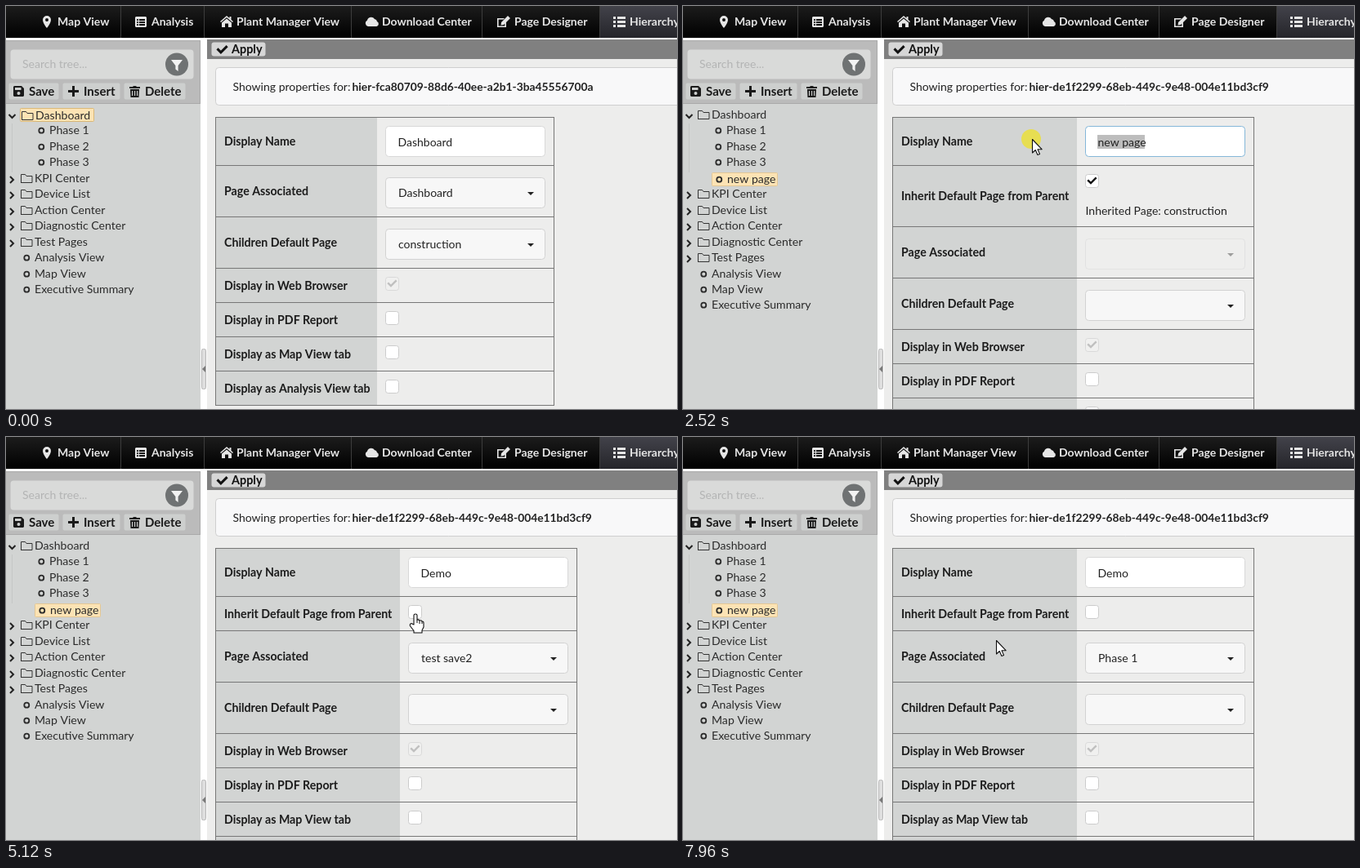
An HTML page with a canvas for the animation above (8000 ms loop, 821x494 px).

```html
<!DOCTYPE html>
<html lang="en">
<head>
<meta charset="utf-8">
<title>Hierarchy editor</title>
<style>
html, body { margin: 0; width: 100%; height: 100%; overflow: hidden; background: #fff; }
canvas { display: block; }
</style>
</head>
<body>
<canvas id="stage" width="821" height="494"></canvas>
<script>
const ctx = document.getElementById('stage').getContext('2d');
const LOOP = 8000;

// Bursts of picture changes: first time, last time, number of steps.
const BURSTS = [
  [0, 0, 1], [250, 860, 9], [1100, 1310, 4], [1460, 1460, 1], [1610, 1610, 1], [1710, 2410, 10],
  [2520, 2520, 1], [2560, 2650, 2], [2810, 2810, 1], [3110, 3270, 3], [3420, 3510, 2],
  [3970, 4060, 2], [4270, 4450, 3], [4530, 5060, 8], [5120, 5820, 10], [5910, 5910, 1],
  [6000, 6460, 7], [6710, 7020, 5], [7110, 7110, 1], [7260, 7410, 3], [7720, 7960, 4]
];
const PATH = [
  [250, 581, 472], [480, 335, 290], [710, 130, 125], [860, 101, 100], [1310, 101, 99],
  [1700, 101, 99], [2030, 572, 168], [2100, 572, 168], [2410, 464, 165], [2520, 427, 163],
  [2560, 426, 160], [2650, 421, 141], [3970, 421, 141], [4060, 440, 142], [4270, 446, 148],
  [4450, 487, 180], [4780, 501, 217], [5200, 501, 217], [5290, 518, 176], [5590, 531, 266],
  [5920, 531, 266], [6150, 682, 300], [6460, 739, 370], [6640, 741, 371], [7020, 592, 372],
  [7260, 592, 372], [7340, 588, 370], [7640, 588, 370], [7720, 530, 338], [7800, 430, 285],
  [7880, 348, 258], [7960, 383, 249]
];
const CLICKS = [[1310, 1460], [2090, 2560], [4860, 5120], [5660, 5810], [6150, 6450], [7260, 7410]];
const INSERTED = 1610, UNCHECKED = 5120, OPENED = 5735, CLOSED = 7330;
const SCROLL = 577;

const ICONS = {
  pin: 'M5 0A5 5 0 0 1 10 5C10 9 5 15 5 15S0 9 0 5A5 5 0 0 1 5 0ZM5 3A2 2 0 1 0 5 7A2 2 0 1 0 5 3Z',
  table: 'M1 0H13L14 1V12L13 13H1L0 12V1ZM2 3H4V5H2ZM5 3H12V5H5ZM2 6H4V8H2ZM5 6H12V8H5ZM2 9H4V11H2ZM5 9H12V11H5Z',
  home: 'M8 0L11.5 3V1H13.5V4.8L16 7L15 8L8 2L1 8L0 7ZM8 3.6L14 8.6V14H10V9.5H6V14H2V8.6Z',
  cloud: 'M4 12A4 4 0 0 1 3 4.5A5 5 0 0 1 12 3A3.5 3.5 0 0 1 15 6A3.2 3.2 0 0 1 14.5 12Z',
  edit: 'M0 3H9L7.5 4.6H1.6V12.4H9.4V9.5L11 8V14H0ZM13 0L16 3L8 11L4.5 11.6L5 8Z',
  list: 'M0 0H3V3H0ZM5 0H15V3H5ZM0 5H3V8H0ZM5 5H15V8H5ZM0 10H3V13H0ZM5 10H15V13H5Z',
  save: 'M1 0H10L13 3V12L12 13H1L0 12V1ZM2 2V5H9.5V2ZM6.5 7A2 2 0 1 0 6.5 11A2 2 0 1 0 6.5 7Z',
  plus: 'M5 0H8V5H13V8H8V13H5V8H0V5H5Z',
  trash: 'M0 1H4L5 0H8L9 1H13V3H0ZM1 4H12L11.5 14H1.5ZM3 6V12H4.2V6ZM6 6V12H7.2V6ZM9 6V12H10.2V6Z',
  funnel: 'M0 0H14L8.6 7V14L5.4 11.5V7Z'
};
const ARROW = 'M0 0V16.5L3.8 13L6.4 19L9 17.9L6.5 12.2H11.6Z';
const HAND = 'M-2 13V1.5Q-2 0 0 0Q2 0 2 1.5V7Q4 6.4 5 8Q7 7.3 8 9Q10 8.6 10 11V16L8 20V23H-2V20.5L-6.6 14.5Q-7.2 12 -5 11.5Z';

const NAV = [
  ['Map View', 'pin', 45, 12, 63], ['Analysis', 'table', 158, 13, 178],
  ['Plant Manager View', 'home', 262, 12, 282], ['Download Center', 'cloud', 439, 13, 460],
  ['Page Designer', 'edit', 601, 12, 622], ['Hierarchy', 'list', 743, 13, 763]
];
const BUTTONS = [['Save', 'save', 3, 65, 9, 28], ['Insert', 'plus', 69, 140, 76, 95], ['Delete', 'trash', 144, 220, 151, 170]];
const FOLDERS = ['KPI Center', 'Device List', 'Action Center', 'Diagnostic Center', 'Test Pages'];
const PAGES = ['Analysis View', 'Map View', 'Executive Summary'];
const OPTIONS = [
  'test save2', 'Label Link Test', 'Test Label Links2', 'Kitchen Sink', 'Dummy Page for|deletion',
  'Dashboard', 'construction', 'Map View', 'Analysis View', 'Device List', 'Action Center',
  'Test Page for|Summary', 'KPI Center', 'Executive Summary', 'Test Pages', 'No Response from|Device',
  'Phase 1', 'Phase 2', 'More Status Available', 'PV Analog Output|Saturated', 'Phase 3'
];

function snap(t) {
  let last = 0;
  for (const [from, to, n] of BURSTS) {
    if (t < from) break;
    const gap = n > 1 ? (to - from) / (n - 1) : 1;
    last = from + gap * Math.min(n - 1, Math.floor((t - from) / gap + 1e-6));
  }
  return last;
}

function pointerAt(t) {
  let i = 0;
  while (i < PATH.length - 2 && t > PATH[i + 1][0]) i++;
  const [t0, x0, y0] = PATH[i], [t1, x1, y1] = PATH[i + 1];
  const k = Math.min(1, Math.max(0, (t - t0) / (t1 - t0)));
  return { x: Math.round(x0 + (x1 - x0) * k), y: Math.round(y0 + (y1 - y0) * k) };
}

const inside = (p, x0, y0, x1, y1) => p.x >= x0 && p.x < x1 && p.y >= y0 && p.y < y1;
const blinkOn = (t, since) => Math.floor((t - since) / 530) % 2 === 0;

function rect(x, y, w, h, color) {
  ctx.fillStyle = color;
  ctx.fillRect(x, y, w, h);
}

function box(x, y, w, h, r, fill, border) {
  ctx.beginPath();
  ctx.roundRect(x + .5, y + .5, w - 1, h - 1, r);
  ctx.fillStyle = fill;
  ctx.fill();
  if (border) {
    ctx.strokeStyle = border;
    ctx.lineWidth = 1;
    ctx.stroke();
  }
}

// y is the middle of the capitals
function text(str, x, y, color = '#222', size = 14, weight = 400) {
  ctx.font = `${weight} ${size}px Lato, sans-serif`;
  ctx.fillStyle = color;
  ctx.fillText(str, x, y + 5);
}

function disc(x, y, r, color) {
  ctx.beginPath();
  ctx.arc(x, y, r, 0, Math.PI * 2);
  ctx.fillStyle = color;
  ctx.fill();
}

function line(points, color, width) {
  ctx.beginPath();
  points.forEach(([x, y]) => ctx.lineTo(x, y));
  ctx.strokeStyle = color;
  ctx.lineWidth = width;
  ctx.stroke();
}

function shape(path, x, y, fill, border) {
  ctx.save();
  ctx.translate(x, y);
  const p = new Path2D(path);
  ctx.fillStyle = fill;
  ctx.fill(p, 'evenodd');
  if (border) {
    ctx.strokeStyle = border;
    ctx.lineWidth = 1.1;
    ctx.lineJoin = 'round';
    ctx.stroke(p);
  }
  ctx.restore();
}

const tick = (x, y, s, color, width) =>
  line([[x, y + 4 * s], [x + 4 * s, y + 8 * s], [x + 11 * s, y + s]], color, width);

function drawNav() {
  const shade = ctx.createLinearGradient(0, 0, 0, 39);
  shade.addColorStop(0, '#1c1c1c');
  shade.addColorStop(1, '#000');
  rect(0, 0, 821, 39, shade);
  const active = ctx.createLinearGradient(0, 0, 0, 39);
  active.addColorStop(0, '#42424a');
  active.addColorStop(1, '#25252a');
  rect(726, 0, 95, 39, active);
  for (const x of [140, 242, 422, 582, 726]) rect(x, 0, 1, 39, '#3c3c3c');
  for (const [label, icon, ix, iy, tx] of NAV) {
    shape(ICONS[icon], ix, iy, '#e6e6e6');
    text(label, tx, 19, '#e6e6e6', 14, 700);
  }
}

function drawTree(t, p) {
  rect(0, 42, 238, 452, '#d2d4d3');
  rect(0, 42, 238, 77, '#bbbbbb');
  rect(0, 119, 238, 1, '#a9a9a9');
  rect(0, 42, 238, 1, '#a9a9a9');
  rect(237, 42, 1, 78, '#a9a9a9');
  box(5, 53, 225, 37, 4, '#d9dad9');
  text('Search tree...', 20, 71, '#b3b4b4');
  disc(209, 71.5, 14, '#6f7273');
  shape(ICONS.funnel, 202, 66, '#f2f2f2');
  for (const [label, icon, x0, x1, ix, tx] of BUTTONS) {
    const hover = label === 'Insert' && t >= 250 && inside(p, x0, 94, x1, 115);
    box(x0, 94, x1 - x0, 21, 2, hover ? '#add8e6' : '#cdcfce');
    shape(ICONS[icon], ix, 98, '#1a1a1a');
    text(label, tx, 105, '#1a1a1a', 15, 700);
  }

  const added = t >= INSERTED;
  const rows = [['Dashboard', 'open'], ...['Phase 1', 'Phase 2', 'Phase 3'].map(s => [s, 'child'])];
  if (added) rows.push(['new page', 'child']);
  rows.push(...FOLDERS.map(s => [s, 'shut']), ...PAGES.map(s => [s, 'leaf']));
  rows.forEach(([label, kind], i) => {
    let y = Math.round(133 + 19.45 * i);
    let x = kind === 'child' ? 53 : 35;
    const bullet = kind === 'child' || kind === 'leaf';
    if (label === (added ? 'new page' : 'Dashboard')) {
      if (added) box(35, y - 7, 81, 17, 1, '#fce3b4', '#e3c795');
      else box(17, y - 8, 91, 17, 1, '#fce3b4', '#d9b878');
      x++;
      y += added ? 1 : 1;
      if (added) y = 212;
    }
    text(label, x, y, '#2b2b2b', 14.1);
    if (bullet) {
      ctx.beginPath();
      ctx.arc(x - 9.7, y + .7, 3, 0, Math.PI * 2);
      ctx.strokeStyle = '#2b2b2b';
      ctx.lineWidth = 1.8;
      ctx.stroke();
      return;
    }
    const f = x - 16.5;
    line([[f, y + 5.5], [f, y - 4.5], [f + 5, y - 4.5], [f + 6.5, y - 2.5], [f + 13.5, y - 2.5], [f + 13.5, y + 5.5], [f - .5, y + 5.5]], '#333', 1);
    if (kind === 'open') line([[3.5, 133], [7.5, 137], [11.5, 133]], '#222', 2);
    else line([[5, y - 2], [9, y + 2], [5, y + 6]], '#222', 2);
  });
  line([[7.5, 144], [7.5, 204]], '#c5c7c6', 1);

  box(239, 420, 6, 50, 2, '#dedede', '#b5b5b5');
  shape('M4 0V8L0 4Z', 240, 441, '#777');
}

function drawSelect(x, y, value, disabled) {
  ctx.globalAlpha = disabled ? .4 : 1;
  box(x, y, 196, 38, 4, disabled ? '#eeeeee' : '#f7f7f7', '#d2d2d2');
  text(value, x + 16, y + 19);
  shape('M0 0H8L4 4Z', x + 174, y + 18, '#222');
  ctx.globalAlpha = 1;
}

function drawCheckbox(x, y, checked, muted) {
  ctx.globalAlpha = muted ? .6 : 1;
  box(x, y, 17, 17, 3, muted ? '#f2f2f2' : '#fff', '#cccccc');
  if (checked) tick(x + 3.2, y + 3.5, .95, muted ? '#a0a0a0' : '#111', 2.4);
  ctx.globalAlpha = 1;
}

function drawName(t, p, x, y) {
  const focused = t >= 2085 && t < 4850;
  box(x, y, 196, 38, 4, '#fff', focused ? '#85b7d9' : '#d8d8d8');
  let value = 'Dashboard';
  if (t >= INSERTED) {
    const typed = [3110, 3190, 3270, 3420].filter(k => t >= k).length;
    value = typed ? 'Demo'.slice(0, typed) : 'new page';
  }
  if (focused && t < 3110) {
    const from = Math.max(507, Math.min(565, p.x));
    rect(t >= 2410 ? 507 : from, 158, t >= 2410 ? 58 : 565 - from, 17, '#bdbdbd');
  }
  text(value, x + 15.5, y + 20);
  if (focused && t >= 3110 && blinkOn(t, 3420)) {
    rect(Math.round(x + 16 + ctx.measureText(value).width), y + 11, 1, 17, '#222');
  }
}

function drawForm(t, p) {
  rect(246, 41, 575, 453, '#ededec');
  rect(246, 41, 575, 24, '#808080');
  box(251, 44, 67, 18, 3, '#d6d6d6');
  tick(258.5, 48, 1.1, '#111', 3);
  text('Apply', 276, 53, '#111', 14.4, 700);

  const added = t >= INSERTED, inherits = t < UNCHECKED;
  box(256, 75, 600, 47, 4, '#f8f8f9', '#cfcfcf');
  text('Showing properties for:', 277.5, 99);
  text(added ? 'hier-de1f2299-68eb-449c-9e48-004e11bd3cf9' : 'hier-fca80709-88d6-40ee-a2b1-3ba45556700a', 423.5, 99, '#222', 13.8, 700);

  const split = added ? 482 : 454, right = added ? 698 : 670, x = split + 10;
  const pageValue = !added ? 'Dashboard' : inherits ? '' : t < CLOSED ? 'test save2' : 'Phase 1';
  const rows = [['Display Name', 59, y => drawName(t, p, x, y + 11)]];
  if (added) rows.push(['Inherit Default Page from Parent', inherits ? 75 : 42, y => {
    drawCheckbox(x, y + 11, inherits);
    if (inherits) text('Inherited Page: construction', x + .5, y + 56);
  }]);
  rows.push(
    ['Page Associated', 63, y => drawSelect(x, y + 15, pageValue, added && inherits)],
    ['Children Default Page', 63, y => drawSelect(x, y + 15, added ? '' : 'construction')],
    ['Display in Web Browser', 42, y => drawCheckbox(x, y + 11, true, true)],
    ...['Display in PDF Report', 'Display as Map View tab', 'Display as Analysis View tab']
      .map(s => [s, 42, y => drawCheckbox(x, y + 11)])
  );
  let y = 136;
  for (const [label, h, draw] of rows) {
    rect(256, y, split - 256, h, '#d2d4d3');
    rect(256, y, right - 255, 1, '#777');
    text(label, 267, Math.floor(y + h / 2) + 1, '#1c1c1c', 14.2, 700);
    draw(y);
    y += h;
  }
  rect(256, y, right - 255, 1, '#777');
  rect(256, 136, 1, y - 136, '#777');
  rect(right, 136, 1, y - 135, '#777');
}

function drawMenu(t, p) {
  const progress = Math.min(1, Math.max(0, (t - 6150) / 300));
  box(492, 252, 196, 300, 4, '#fff', '#96c8da');
  text('test save2', 508, 271, '#8c8c8c');
  shape('M0 0H8L4 4Z', 666, 270, '#222');
  if (blinkOn(t, OPENED)) rect(508, 263, 1, 17, '#111');

  ctx.save();
  ctx.beginPath();
  ctx.rect(493, 290, 194, 204);
  ctx.clip();
  let y = 290 - Math.round(SCROLL * progress);
  OPTIONS.forEach((option, i) => {
    const parts = option.split('|'), h = 23 + 14 * parts.length;
    const hover = inside(p, 493, Math.max(290, y), 677, y + h);
    if (hover) rect(493, y, 184, h, '#f2f2f2');
    else if (i === 0) rect(493, y, 184, h, '#f7f7f7');
    rect(493, y + h - 1, 184, 1, '#f5f5f5');
    parts.forEach((s, k) => text(s, 509.5, y + 18 + 14 * k));
    y += h;
  });
  rect(677, 290, 10, 204, '#e6e6e6');
  box(677, 289 + Math.round(108 * progress), 10, 41, 5, '#b8b8b8');
  ctx.restore();
}

function drawPointer(t, p, open) {
  if (t < 250 || (t >= 2810 && t < 3970)) return;
  if (CLICKS.some(([from, to]) => t >= from && t < to)) disc(p.x - 1, p.y, 12, 'rgba(236,224,50,.8)');
  const added = t >= INSERTED;
  const overField = added && (inside(p, 492, 147, 688, 185) || (t >= UNCHECKED && t < CLOSED && inside(p, 492, 252, 688, 290)));
  const overLink = inside(p, 3, 94, 220, 115) || (added && inside(p, 492, 207, 510, 224)) || (open && inside(p, 493, 290, 677, 494));
  if (overField) {
    line([[p.x - 3, p.y - 7.5], [p.x + 4, p.y - 7.5]], '#111', 1);
    line([[p.x + .5, p.y - 7.5], [p.x + .5, p.y + 7.5]], '#111', 1);
    line([[p.x - 3, p.y + 7.5], [p.x + 4, p.y + 7.5]], '#111', 1);
  } else if (overLink) {
    shape(HAND, p.x, p.y, '#fff', '#111');
    line([[p.x + 2, p.y + 7], [p.x + 2, p.y + 11]], '#111', 1);
    line([[p.x + 5, p.y + 8], [p.x + 5, p.y + 12]], '#111', 1);
    line([[p.x + 8, p.y + 9], [p.x + 8, p.y + 12]], '#111', 1);
  } else {
    shape(ARROW, p.x + .5, p.y + .5, '#fff', '#111');
  }
}

function render(now) {
  const t = snap(now % LOOP), p = pointerAt(t);
  const open = t >= OPENED && t < CLOSED;
  rect(0, 0, 821, 494, '#fff');
  drawNav();
  drawTree(t, p);
  drawForm(t, p);
  if (open) drawMenu(t, p);
  drawPointer(t, p, open);
}

const start = performance.now();
function loop() {
  render(performance.now() - start);
  requestAnimationFrame(loop);
}
loop();
</script>
</body>
</html>
```
